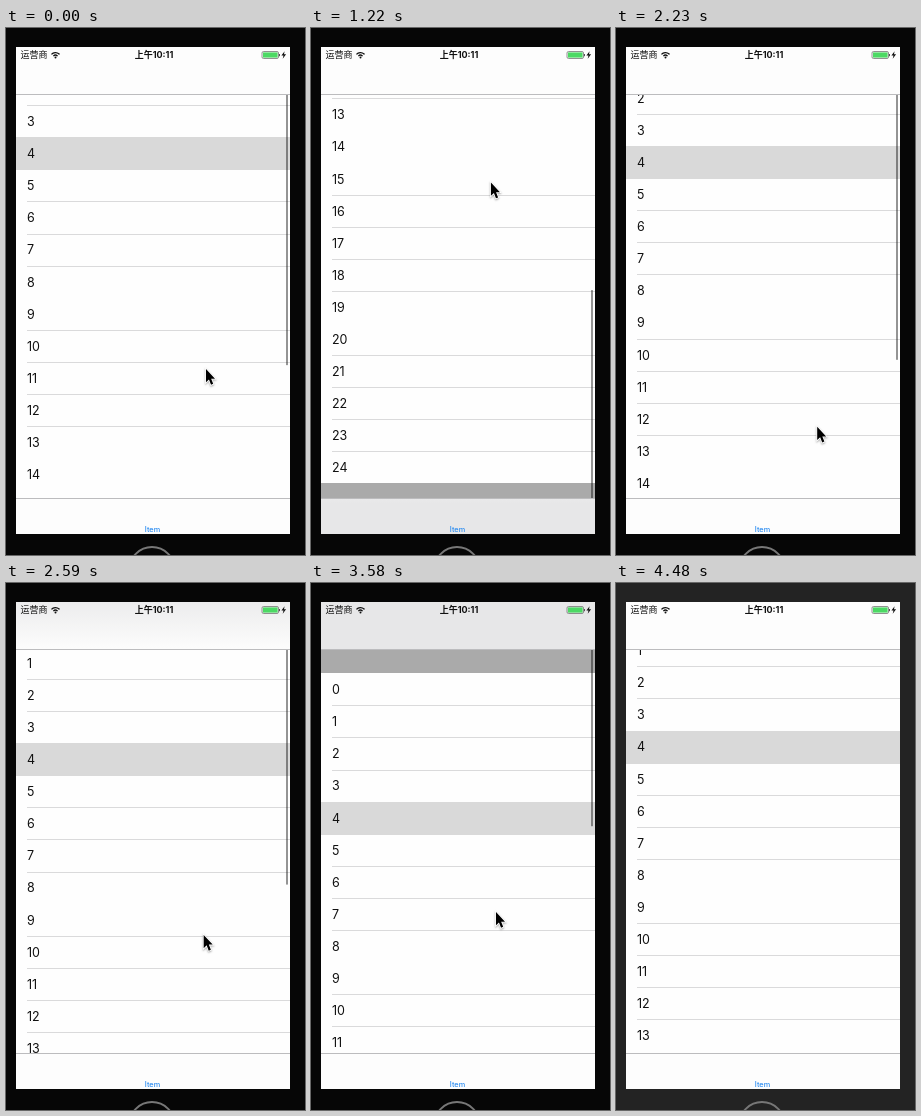
Recreate the animation shown at these times as an HTML page with a canvas. Size 299 by 527 pixels, loop 4580 ms.

```html
<!DOCTYPE html>
<html>
<head>
<meta charset="utf-8">
<style>
html, body { margin: 0; width: 100%; height: 100%; overflow: hidden; background: #060606; }
canvas { display: block; }
</style>
</head>
<body>
<canvas id="stage" width="299" height="527"></canvas>
<script>
const ctx = document.getElementById('stage').getContext('2d');
const LOOP = 4580, TICK = 60, DIM_AT = 4440;
const ROW = 32.08, ROWS = 25, SELECTED = 4;
const LEFT = 10, WIDTH = 274, TOP = 19, BOTTOM = 506, NAV = 66, TAB = 470;
const LATIN = 'Inter, sans-serif', CJK = '"Noto Sans CJK SC", "Noto Sans CJK", sans-serif';

// Turning points of the gestures, eased in between
const TURNS = [
  { t: 0, top: -19, x: 200, y: 341 },
  { t: 600, top: -299.2, x: 193, y: 260 },
  { t: 1320, top: -350, x: 179, y: 147 },
  { t: 1680, top: -298.6, x: 179, y: 147 },
  { t: 2400, top: 39.3, x: 205, y: 442 },
  { t: 2835, top: 19.2, x: 185, y: 196 },
  { t: 3540, top: 90.3, x: 185, y: 329 },
  { t: 4360, top: 149, x: 180, y: 514 },
  { t: DIM_AT, top: 19.2, x: 180, y: 527 }
];

const clamp = v => Math.max(0, Math.min(1, v));

function pose(t) {
  const i = TURNS.findIndex(turn => turn.t > t);
  if (i < 0) return TURNS[TURNS.length - 1];
  const a = TURNS[i - 1], b = TURNS[i];
  const u = (1 - Math.cos(Math.PI * (t - a.t) / (b.t - a.t))) / 2;
  const mix = key => a[key] + (b[key] - a[key]) * u;
  return { top: mix('top'), x: mix('x'), y: mix('y') };
}

function rect(color, x, y, w, h) {
  ctx.fillStyle = color;
  ctx.fillRect(x, y, w, h);
}

function text(str, x, y, font, color = '#111', align = 'left') {
  ctx.font = font;
  ctx.fillStyle = color;
  ctx.textAlign = align;
  ctx.fillText(str, x, y);
}

// Downscaling swallows one or two hairlines out of about five.
const isLost = i => (i + 5.32 - 2.1) % 5.32 < 1.5;

function drawList(top) {
  const rowY = i => Math.round(top + i * ROW);
  rect('#aaa', LEFT, NAV, WIDTH, TAB - NAV);
  rect('#fefefe', LEFT, rowY(0), WIDTH, rowY(ROWS) - rowY(0));
  for (let i = 0; i < ROWS; i++) {
    const y = rowY(i), next = rowY(i + 1);
    if (i === SELECTED) rect('#d9d9d9', LEFT, y, WIDTH, next + 1 - y);
    else if (!isLost(i)) rect('#dadadb', 21, next, LEFT + WIDTH - 21, 1);
    text(i, 21, top + i * ROW + 20.9, '12.5px ' + LATIN);
  }
}

function drawScrollBar(top) {
  const height = BOTTOM - 20, content = ROW * ROWS;
  const offset = 20 - top, limit = content - height;
  const over = Math.max(0, -offset, offset - limit);
  const length = height * height / content - over;
  const y = offset > limit ? BOTTOM - length : TOP + Math.max(0, offset) * height / content;
  rect('rgba(0,0,0,.42)', 280, y, 2, length);
}

// Translucent bar; the grey backdrop shows through when the list is pulled past its edge.
function drawBar(y, h, edge, dir, over) {
  rect('#fdfdfd', LEFT, y, WIDTH, h);
  if (over < 0.7) return;
  const fade = ctx.createLinearGradient(0, edge - 20 * dir, 0, edge + 36 * dir);
  fade.addColorStop(0, 'rgba(231,231,232,1)');
  fade.addColorStop(1, 'rgba(231,231,232,0)');
  ctx.globalAlpha = clamp(0.4 + over / 25);
  rect(fade, LEFT, y, WIDTH, h);
  ctx.globalAlpha = 1;
}

function drawStatus() {
  text('运营商', 14.5, 30.3, '9px ' + CJK);
  text('上午10:11', 148, 30.3, 'bold 9px Inter, ' + CJK, '#111', 'center');
  ctx.strokeStyle = '#111';
  ctx.lineWidth = 1.3;
  for (const r of [2.8, 5.4]) {
    ctx.beginPath();
    ctx.arc(49.5, 30, r, -Math.PI * 0.77, -Math.PI * 0.23);
    ctx.stroke();
  }
  ctx.beginPath();
  ctx.arc(49.5, 29.4, 1, 0, 7);
  ctx.fillStyle = '#111';
  ctx.fill();

  ctx.beginPath();
  ctx.roundRect(256, 23.5, 16.5, 7, 1.5);
  ctx.strokeStyle = '#777';
  ctx.lineWidth = 0.8;
  ctx.stroke();
  rect('#4cd964', 257, 24.4, 14.6, 5.2);
  rect('#555', 273, 26, 1, 2.2);
  ctx.fillStyle = '#111';
  ctx.fill(new Path2D('M278.6 23.3L275.4 27.6H277.5L276.7 30.8L280.1 26.3H278Z'));
}

function drawPointer(x, y) {
  ctx.save();
  ctx.translate(x, y);
  ctx.scale(0.9, 0.95);
  ctx.shadowColor = 'rgba(0,0,0,.35)';
  ctx.shadowBlur = 2;
  ctx.shadowOffsetY = 1;
  const arrow = new Path2D('M0 0V14L3.3 11L5.6 16.6L8 15.6L5.7 10.2H10Z');
  ctx.strokeStyle = '#fff';
  ctx.lineWidth = 1.8;
  ctx.stroke(arrow);
  ctx.shadowColor = 'transparent';
  ctx.fillStyle = '#000';
  ctx.fill(arrow);
  ctx.restore();
}

function draw(now) {
  const t = Math.floor(now % LOOP / TICK) * TICK;
  const { top, x, y } = pose(t);
  const end = top + ROW * ROWS, dimmed = t >= DIM_AT;
  rect(dimmed ? '#232323' : '#060606', 0, 0, 299, 527);

  ctx.save();
  ctx.beginPath();
  ctx.rect(LEFT, NAV, WIDTH, TAB - NAV);
  ctx.clip();
  drawList(top);
  if (!dimmed) drawScrollBar(top);
  ctx.restore();

  drawBar(TOP, NAV - TOP, top, 1, top - 20);
  drawBar(TAB, BOTTOM - TAB, end, -1, BOTTOM - end);
  for (const edge of [NAV, TAB]) rect('#bcbcbe', LEFT, edge, WIDTH, 1);
  drawStatus();
  text('Item', 146.5, 503.5, '500 7.3px ' + LATIN, '#2b8cf0', 'center');

  ctx.beginPath();
  ctx.arc(146, 541.5, 22.5, 0, 7);
  ctx.strokeStyle = '#777';
  ctx.lineWidth = 2;
  ctx.stroke();
  if (!dimmed) drawPointer(x, y);
}

const start = performance.now();
(function tick() {
  draw(performance.now() - start);
  requestAnimationFrame(tick);
})();
</script>
</body>
</html>
```
